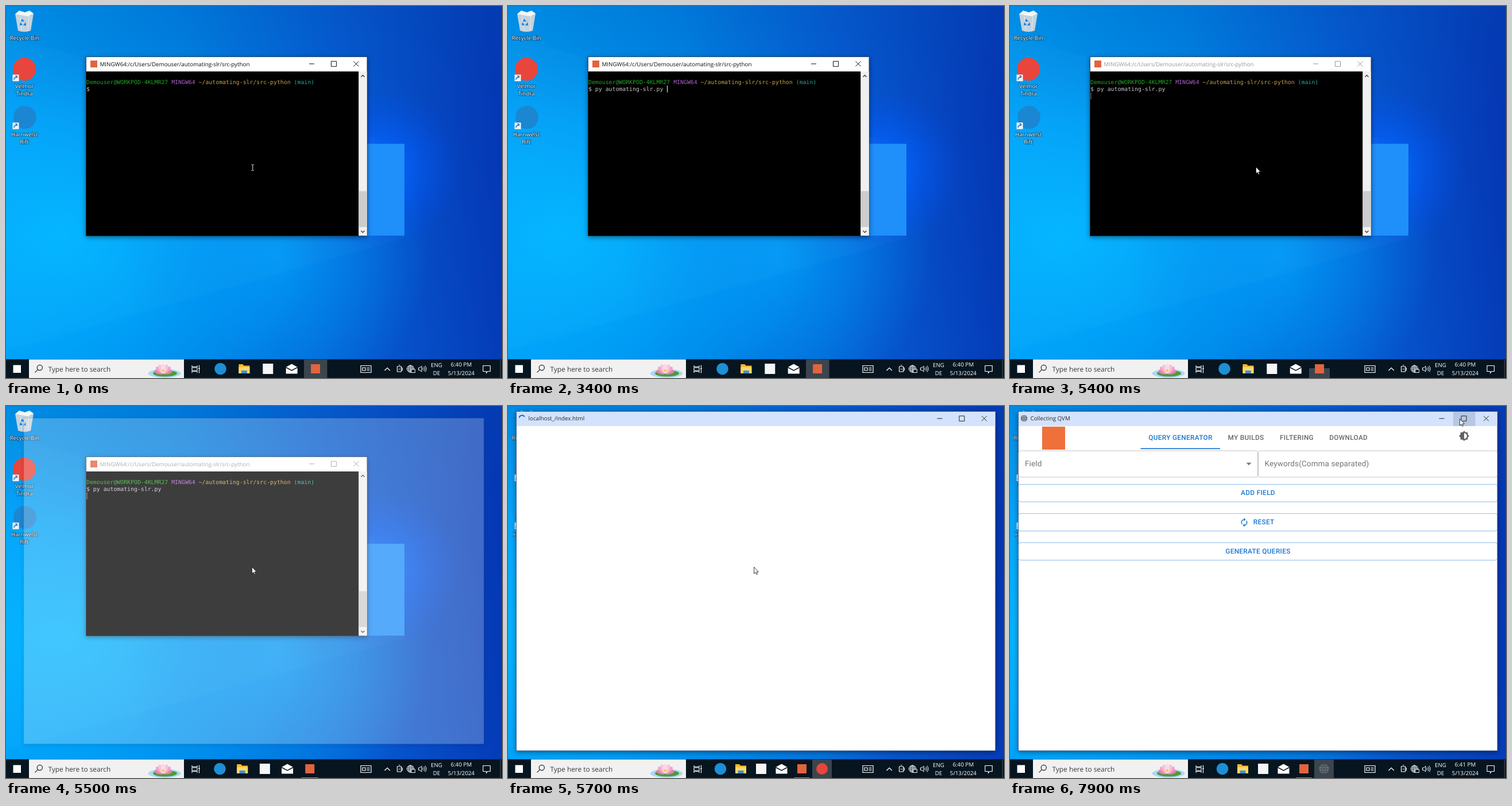
An HTML page for the animation above (8 s loop, 864 by 648 pixels).

```html
<!DOCTYPE html>
<html lang="en">
<head>
<meta charset="utf-8">
<title>Desktop session</title>
<style>
html, body { margin: 0; width: 100%; height: 100%; overflow: hidden; background: #0078dc; }
svg { display: block; width: 864px; height: 648px; }
text { font: 9.8px "Open Sans", "Noto Sans", sans-serif; white-space: pre; text-rendering: geometricPrecision; }
.mid { text-anchor: middle; }
.desk { fill: #fff; stroke: #0008; stroke-width: 1.6px; paint-order: stroke; }
.mono { font: 9.85px "DejaVu Sans Mono", monospace; fill: #c4c4c4; }
.search { font-size: 11.9px; fill: #3a3a3a; }
.tray { fill: #fff; }
.tab { font: 500 11.8px Roboto, sans-serif; letter-spacing: .337px; fill: #666; }
.blue { fill: #1976d2; }
.label { font: 13.5px Roboto, sans-serif; letter-spacing: .127px; fill: #757575; }
.line { fill: none; stroke: currentColor; }
</style>
</head>
<body>
<svg id="stage" viewBox="0 0 864 648">
  <defs>
    <linearGradient id="sky" gradientUnits="userSpaceOnUse" x1="0" y1="330" x2="864" y2="250">
      <stop offset="0" stop-color="#00a0f4"/><stop offset=".38" stop-color="#0084e4"/>
      <stop offset=".7" stop-color="#0659d0"/><stop offset="1" stop-color="#0537b4"/>
    </linearGradient>
    <radialGradient id="left" gradientUnits="userSpaceOnUse" cx="90" cy="400" r="460" gradientTransform="matrix(1 0 0 .72 0 112)">
      <stop offset="0" stop-color="#00b4ff"/><stop offset=".4" stop-color="#00adff" stop-opacity=".75"/>
      <stop offset="1" stop-color="#00a0ff" stop-opacity="0"/>
    </radialGradient>
    <radialGradient id="floor" gradientUnits="userSpaceOnUse" cx="470" cy="430" r="270">
      <stop offset="0" stop-color="#00a2fc" stop-opacity=".75"/><stop offset=".5" stop-color="#0098f6" stop-opacity=".45"/>
      <stop offset="1" stop-color="#0090f0" stop-opacity="0"/>
    </radialGradient>
    <radialGradient id="glow" gradientUnits="userSpaceOnUse" cx="650" cy="285" r="140">
      <stop offset="0" stop-color="#0a7cff"/><stop offset=".4" stop-color="#0460fa" stop-opacity=".65"/>
      <stop offset="1" stop-color="#0450f0" stop-opacity="0"/>
    </radialGradient>
    <linearGradient id="top" x2="0" y2="1">
      <stop offset="0" stop-color="#004cae" stop-opacity=".22"/><stop offset="1" stop-color="#004cae" stop-opacity="0"/>
    </linearGradient>
    <filter id="shadow" x="-5%" y="-5%" width="110%" height="112%">
      <feDropShadow dx="0" dy="2" stdDeviation="4" flood-opacity=".45"/>
    </filter>
  </defs>
</svg>
<script>
const stage = document.getElementById('stage');
const text = (x, y, s, cls = '', more = '') => `<text x="${x}" y="${y}" class="${cls}" ${more}>${s}</text>`;
const rect = (x, y, w, h, fill, more = '') => `<rect x="${x}" y="${y}" width="${w}" height="${h}" fill="${fill}" ${more}/>`;
const disc = (x, y, r, fill) => `<circle cx="${x}" cy="${y}" r="${r}" fill="${fill}"/>`;
const line = (d, color, width = 1) => `<path d="${d}" fill="none" stroke="${color}" stroke-width="${width}"/>`;
const shape = (d, fill, more = '') => `<path d="${d}" fill="${fill}" ${more}/>`;
const group = (id, body, more = '') => `<g id="${id}" ${more}>${body}</g>`;

// Minimise, maximise and close glyphs, centred on x, x + 39 and x + 77.5
const controls = (x, y) =>
  `<path class="line" d="M${x - 4.5} ${y}h9M${x + 34} ${y - 4.5}h9v9h-9zM${x + 73} ${y - 4.5}l9 9m0 -9l-9 9"/>`;

const globe = (x, y, r, back, ink) => disc(x, y, r, back) + line(
  `M${x - r} ${y}h${2 * r}M${x} ${y - r}v${2 * r}M${x - r * .8} ${y - r * .5}h${r * 1.6}M${x - r * .8} ${y + r * .5}h${r * 1.6}` +
  `M${x} ${y - r}a${r * .5} ${r} 0 0 0 0 ${2 * r}a${r * .5} ${r} 0 0 0 0 ${-2 * r}`, ink, .9);

const shortcut = y => rect(11.5, y, 11, 11.5, '#f4f4f4') +
  line(`M14 ${y + 9}q0 -4 4.5 -4.5m-2.5 -2.2h3.2v3.4`, '#1565c0', 1.3);

const wallpaper =
  rect(0, 0, 864, 648, 'url(#sky)') + rect(0, 0, 864, 648, 'url(#left)') +
  rect(0, 0, 864, 648, 'url(#floor)') + rect(0, 0, 864, 200, 'url(#top)') +
  rect(480, 130, 384, 360, 'url(#glow)') +
  shape('M640 230L0 52V600L694 405Z', '#fff', 'opacity=".02"') +
  rect(534, 240, 160, 160, '#1f8ffa');

const icons =
  shape('M16 14L48 13L43 43Q32 47 21 43Z', '#c3d3de') + shape('M16 14L23 8L33 11L41 8L48 13L38 18Z', '#f4f6f8') +
  line('M25 18L27 43M40 17L38 43', '#e3ebf0') +
  shape('M28 22l4 5h-6zM24 34l1 -6l4 5zM34 28l1 6h-5z', '#1f7fd6') +
  disc(32, 110, 20, '#e8453c') + shortcut(119.5) + disc(33, 194, 20, '#1b86d2') + shortcut(203) +
  [[59, 'Recycle Bin'], [143, 'Velmor'], [156, 'Tindra'], [227, 'Harnwelst'], [240, 'Rift']]
    .map(([y, s]) => text(32, y, s, 'desk mid')).join('');

const span = (fill, s) => `<tspan fill="${fill}">${s}</tspan>`;
const terminal = group('terminal',
  rect(139.5, 88.5, 489.5, 312, '#fff', 'filter="url(#shadow)" stroke="#1d3c60" stroke-width=".8"') +
  rect(147, 95, 12, 12, '#e2643f') +
  group('termBar', text(163.5, 104.7, 'MINGW64:/c/Users/Demouser/automating-slr/src-python', '', 'fill="currentColor"') + controls(532.5, 100.8)) +
  rect(139.5, 114, 475, 286.5, '#000') + rect(614.5, 114, 14.2, 286, '#f0f0f0') + rect(615, 322.5, 13.5, 62.5, '#cdcdcd') +
  line('M618.5 123.5l3 -3l3 3M618.5 391.5l3 3l3 -3', '#444', 1.5) +
  text(140, 135.5, span('#22a722', 'Demouser@WORKPOD-4KLMR27') + span('#ad5fcc', ' MINGW64') +
    span('#c8a046', ' ~/automating-slr/src-python') + span('#2aa79b', ' (main)'), 'mono') +
  text(140, 147.5, '', 'mono', 'id="command"') + rect(0, 0, 1.3, 12, '#ccc', 'id="caret"'));

const button = (y, s, x = 432) =>
  rect(15, y, 833.5, 30.5, 'none', 'rx="3" stroke="#8cbbe9"') + text(x, y + 18.5, s, 'tab blue mid');

const page = group('page',
  rect(56, 36, 40, 40, '#f0703c') +
  text(297, 58.5, 'QUERY GENERATOR', 'tab blue mid') + text(411, 58.5, 'MY BUILDS', 'tab mid') +
  text(499.5, 58.5, 'FILTERING', 'tab mid') + text(589.7, 58.5, 'DOWNLOAD', 'tab mid') +
  rect(227.5, 73.4, 138.5, 1.7, '#1976d2', 'id="underline"') +
  rect(784.7, 45.9, 12.6, 12.6, '#616161') + rect(784.7, 45.9, 12.6, 12.6, '#616161', 'transform="rotate(45 791 52.2)"') +
  shape('M791 47.2a5 5 0 0 1 0 10z', '#fff') +
  rect(15, 78, 416.5, 46, 'none', 'rx="3.5" stroke="#c4c4c4"') + rect(432.5, 78, 416, 46, 'none', 'rx="3.5" stroke="#c4c4c4"') +
  text(26, 105, 'Field', 'label') + text(443.5, 105, 'Keywords(Comma separated)', 'label') +
  shape('M411.5 98.7h9l-4.5 4.5z', '#757575') +
  button(136.5, 'ADD FIELD') + button(187.3, 'RESET', 442.2) + button(238, 'GENERATE QUERIES') +
  line('M404.3 205.8a4.9 4.9 0 0 1 3.7 -8M411.7 199.8a4.9 4.9 0 0 1 -3.7 8', '#1976d2', 1.3) +
  shape('M407.5 195v5.6l3 -2.8zM408.5 205v5.6l-3 -2.8z', '#1976d2'));

const browser = group('browser',
  rect(14.5, 9.5, 834.5, 591, '#fff', 'filter="url(#shadow)" stroke="#35548a" stroke-width=".8"') +
  group('titleBar',
    rect(15, 10, 833.5, 25, '#d3e3fd') + rect(772, 10, 38.5, 25, '#b6c7e4', 'id="hover"') +
    '<path id="spinner" fill="none" stroke="#1a62c9" stroke-width="2"/>' +
    group('favicon', globe(24.5, 21.5, 5.7, '#4b5057', '#b9c0c9')) +
    text(35.5, 25.4, '', '', 'id="title" fill="#26282c"') +
    group('controls', controls(752, 21.8), 'color="#222"')) + page);

const lotus =
  `<ellipse cx="276" cy="640" rx="28.5" ry="7.5" fill="#a9d9f2"/><ellipse cx="277" cy="640" rx="21" ry="5.5" fill="#4f9a3a"/>` +
  [-78, 78, -52, 52, -27, 27, 0].map((a, i) =>
    `<ellipse cx="274" cy="631.5" rx="4" ry="8.5" fill="${['#e77fae', '#f3a3c5', '#f8c3d9'][i >> 1] || '#fbd9e6'}" transform="rotate(${a} 274 639)"/>`).join('') +
  disc(274, 635, 2.3, '#f6c94f');

const apps = [
  disc(0, 632, 10.3, '#1d8fd6'),
  shape('M-9.5 624h7l2 2.5h10v13.5h-19z', '#f5b82e') + rect(-9.5, 629, 19, 11, '#ffd766') + rect(-5, 635, 10, 5, '#3b91d8'),
  rect(-9, 623, 18, 18, '#f5f5f5'),
  shape('M-10 629L0 623.5L10 629V640.5H-10Z', '#fff') + line('M-10 629.5L0 635L10 629.5', '#06151f', 1.5),
  rect(-8, 624, 16, 16, '#e2643f')
].map((body, i) => group('app' + i, body)).join('');

const tray =
  line('M618 626.5h18v12h-18zM621 630h5v5h-5zM628.5 630h5m-5 2.5h5m-5 2.5h5', '#fff', 1.2) +
  line('M659.5 635l4.7 -4.7l4.7 4.7', '#fff', 1.3) +
  line('M681.5 628h7v9h-7zM684 625.7h2.4M688.5 630.5h2v4h-2M683.6 632.5h3', '#fff', 1.1) +
  globe(704.5, 632, 6, 'none', '#fff') + `<circle cx="704.5" cy="632" r="6" fill="none" stroke="#fff"/>` +
  rect(706, 633, 6.5, 5.5, '#06151f', 'stroke="#fff" stroke-width=".9"') +
  line('M718.5 630.2h2.5l3 -3v10l-3 -3h-2.5zM726 630q1.6 2 0 4.2M728 628.2q3.2 3.8 0 7.8M730 626.6q4.4 5.4 0 11', '#fff', 1) +
  text(750, 629, 'ENG', 'tray mid') + text(750, 643.3, 'DE', 'tray mid') +
  text(793, 628.3, '', 'tray mid', 'id="clock"') + text(793, 643.3, '5/13/2024', 'tray mid') +
  line('M831 626.5h12.5v10h-4.5l-2.3 2.8v-2.8h-5.7z', '#fff', 1.1) + line('M861.3 616v32', '#4a555d');

const taskbar =
  rect(0, 615.4, 864, 32.6, '#06151f') + rect(12.5, 625.5, 13.5, 13.5, '#fff') +
  rect(40, 615.6, 270, 32.4, '#f1f1f1') + `<circle cx="58.8" cy="630" r="4.6" fill="none" stroke="#222" stroke-width="1.2"/>` +
  line('M55.5 633.4l-5 5', '#222', 1.3) + text(73.5, 637, 'Type here to search', 'search') + lotus +
  line('M324 626v2.5h9v-2.5M324 639v-2.5h9v2.5M324 630h9v5h-9zM336.5 625.5v14M335 631.5h3', '#fff', 1.1) +
  rect(0, 616, 0, 32, '#3a454e', 'id="active"') + rect(0, 647.2, 0, .8, '#76b9ed', 'id="open"') +
  apps + group('newApp',
    group('appLogo', disc(547, 632, 10, '#e8453c')) + group('appGlobe', globe(547, 632, 8.5, '#6a7076', '#3a424a'))) + tray;

const pointers =
  group('beam', line('M427.5 276.5h1.5l.7 .8l.7 -.8h1.5M429.7 277v9M427.5 286.5h1.5l.7 -.8l.7 .8h1.5', '#e6e6e6')) +
  group('arrow', shape('M0 0V11.5L2.6 9.1L4.4 13L6.1 12.2L4.4 8.5H8Z', '#fff', 'stroke="#111" stroke-width=".8"'));

stage.insertAdjacentHTML('beforeend', wallpaper + icons + terminal + browser + taskbar + pointers);

const el = id => document.getElementById(id);
const set = (id, attrs) => { for (const k in attrs) el(id).setAttribute(k, attrs[k]); };
const show = (id, on) => { el(id).style.display = on ? '' : 'none'; };
const between = (t, a, b) => t >= a && t < b;

function arc(x, y, r, from, sweep) {
  const at = a => [x + r * Math.cos(a * Math.PI / 180), y + r * Math.sin(a * Math.PI / 180)].join(' ');
  return `M${at(from)}A${r} ${r} 0 ${sweep > 180 ? 1 : 0} 1 ${at(from + sweep)}`;
}

function drawTerminal(t) {
  const typed = t < 2000 ? '' : t < 2100 ? 'p' : t < 3400 ? 'py' : 'py automating-slr.py ';
  el('command').textContent = '$ ' + typed;
  const ran = t >= 4100;
  const on = between(t, 200, 700) || between(t, 1300, 1800) || between(t, 2000, 3900) || between(t, 4100, 4700) || t >= 5200;
  show('caret', on);
  set('caret', {
    x: ran ? 140.3 : 140.5 + (2 + typed.length) * 5.93,
    y: ran ? 150.5 : 138.5,
    fill: t >= 5300 ? '#666' : '#ccc'
  });
  set('termBar', { color: t >= 5300 ? '#999' : '#111' });
}

function drawBrowser(t) {
  show('browser', t >= 5500);
  show('titleBar', t >= 5600);
  const [scale, alpha] = t < 5600 ? [.961, .24] : t < 5700 ? [.99, .8] : [1, 1];
  set('browser', { opacity: alpha, transform: `translate(431.5 304.5) scale(${scale}) translate(-431.5 -304.5)` });
  const loaded = t >= 6000;
  show('page', loaded);
  show('favicon', loaded);
  show('spinner', !loaded);
  const turn = (t - 5600) / 100;
  set('spinner', { d: arc(24.5, 21.3, 5, 45 + turn * 145, turn < 1 ? 270 : 140) });
  el('title').textContent = loaded ? 'Collecting QVM' : 'localhost_/index.html';
  const k = Math.min(1, Math.max(0, (t - 6000) / 200));
  set('underline', { x: 218 + 9.5 * k, width: 140 - 1.5 * k });
  show('hover', t >= 7900);
}

function drawTaskbar(t) {
  const [x, gap] = t < 5500 ? [373.5, 41.4] : t < 5600 ? [372.5, 39.2] : [370, 35.5];
  for (let i = 0; i < 5; i++) set('app' + i, { transform: `translate(${x + i * gap})` });
  const last = x + 4 * gap;
  const shrunk = t >= 5400;
  show('active', t < 5500 || t >= 5700);
  if (t >= 5700) set('active', { x: 530, y: 616, width: 34, height: 32 });
  else if (shrunk) set('active', { x: 521, y: 631, width: 36, height: 17 });
  else set('active', { x: 519, y: 616, width: 40.5, height: 32 });
  show('open', t >= 5500);
  set('open', { x: last - gap * .38, width: gap * .76 });
  show('newApp', t >= 5700);
  show('appLogo', t < 6900);
  show('appGlobe', t >= 6900);
  el('clock').textContent = t < 6900 ? '6:40 PM' : '6:41 PM';
}

function drawPointer(t) {
  show('beam', t < 2000);
  show('arrow', t >= 5300);
  const p = Math.min(1, Math.max(0, (t - 7400) / 500));
  const ease = p * p * (3 - 2 * p);
  set('arrow', { transform: `translate(${428.5 + 355 * ease} ${280.5 - 258 * ease})` });
}

function frame(now) {
  const t = Math.floor(now % 8000 / 100) * 100;
  drawTerminal(t);
  drawBrowser(t);
  drawTaskbar(t);
  drawPointer(t);
  requestAnimationFrame(frame);
}
frame(0);
</script>
</body>
</html>
```
